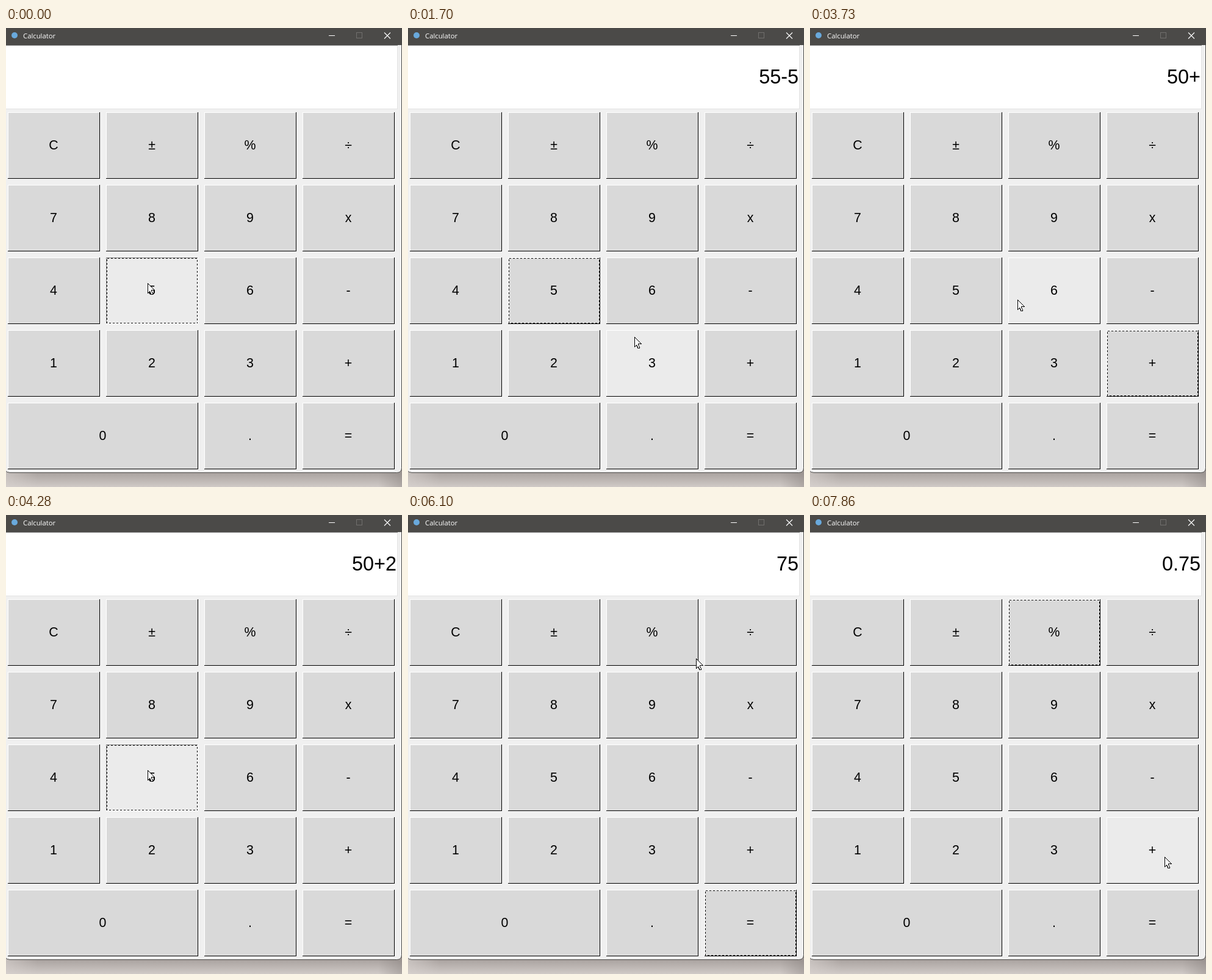
These frames come from a looping animation (649x752 px, 8 s). An HTML page:

```html
<!DOCTYPE html>
<html lang="en">
<head>
<meta charset="utf-8">
<title>Calculator</title>
<style>
  html, body { margin: 0; width: 100%; height: 100%; overflow: hidden; }
  svg { display: block; width: 649px; height: 752px; }
  text { font-family: "Liberation Sans", Arial, sans-serif; }
  .bar { font: 11.3px "Open Sans", "Noto Sans", sans-serif; fill: #fff; }
  .label { font-size: 21.33px; text-anchor: middle; }
  .face { fill: #d9d9d9; }
  .hover .face { fill: #ebebeb; }
  .lite { fill: #fff; }
  .dark { fill: #000; }
  .pressed .lite { fill: #828282; }
  .pressed .dark { fill: #fff; }
  .focus { fill: none; stroke: #000; stroke-dasharray: 3; visibility: hidden; }
  .focused .focus { visibility: visible; }
  .crisp, .key rect, .key path { shape-rendering: crispEdges; }
</style>
</head>
<body>
<svg viewBox="0 0 649 752">
  <defs>
    <linearGradient id="shade" x2="0" y2="1">
      <stop offset=".4" stop-color="#aca5a2"/>
      <stop offset="1" stop-color="#d0cac7"/>
    </linearGradient>
    <linearGradient id="side">
      <stop offset="0" stop-color="#d8d2cf" stop-opacity=".6"/>
      <stop offset=".08" stop-color="#d8d2cf" stop-opacity="0"/>
      <stop offset=".94" stop-color="#807976" stop-opacity="0"/>
      <stop offset="1" stop-color="#807976" stop-opacity=".4"/>
    </linearGradient>
  </defs>
  <rect y="716" width="649" height="36" fill="url(#shade)"/>
  <rect y="716" width="649" height="36" fill="url(#side)"/>
  <path d="M-2 -2H648.5V720.5Q648.5 728.5 640.5 728.5H6Q1 728.5 -2 724Z" fill="#f0f0f0" stroke="#4b4a48"/>
  <g class="crisp">
    <rect width="649" height="28" fill="#4b4a48"/>
    <rect y="28" width="642" height="105" fill="#e3e3e3"/>
    <rect y="28" width="642" height="1" fill="#828282"/>
    <rect y="29" width="641" height="103" fill="#fff"/>
    <path d="M529 12.5H539" stroke="#fff"/>
    <rect x="574.5" y="7.5" width="9" height="9" fill="none" stroke="#716f6d"/>
  </g>
  <path d="M620 7.5L630 17.5M630 7.5L620 17.5" stroke="#fff" stroke-width="1.1"/>
  <circle cx="14" cy="12" r="5" fill="#69a9dc"/>
  <text class="bar" x="28" y="17">Calculator</text>
  <text id="display" x="640" y="91" font-size="32.4" text-anchor="end"></text>
  <g id="keys"></g>
  <path id="cursor" class="crisp" d="M.5 .5V16.5L3.5 13.5L6 18.5H8L8.5 17L6.5 12.5V11.5H11.5Z" fill="#fff" stroke="#000"/>
</svg>
<script>
const LOOP = 8000, BEAT = LOOP / 59;
const HOLD = 120;   // how long a key stays down
const READ = 300;   // how long the pointer rests on a result
const EDGE = 6;
const byId = id => document.getElementById(id);

// Each row lists its labels; the wide 0 takes two columns.
const keys = ["C±%÷", "789x", "456-", "123+", "0 .="].flatMap((row, r) =>
  [...row].map((name, c) => ({
    name, x: 3 + 161 * c, y: 138 + 119 * r, w: name === "0" ? 312 : 151, h: 109
  })).filter(key => key.name !== " "));

byId("keys").innerHTML = keys.map(({ name, x, y, w, h }) => `
  <g class="key" transform="translate(${x} ${y})">
    <rect class="face" width="${w}" height="${h}"/>
    <path class="lite" d="M0 0H${w}V1H1V${h}H0Z"/>
    <path class="dark" d="M${w} 0V${h}H0V${h - 1}H${w - 1}V0Z"/>
    <text class="label" x="${w / 2 - 0.5}" y="61">${name}</text>
    <rect class="focus" x="1.5" y="1.5" width="${w - 3}" height="${h - 3}"/>
  </g>`).join("");
document.querySelectorAll(".key").forEach((el, i) => keys[i].el = el);

// Key presses, and points the pointer passes on its way
const stops = [
  { at: 0, key: "5" },
  { at: 290, key: "5" },
  { at: 990, key: "-" },
  { at: 1430, key: "5", hold: 0 },
  { at: 1700, x: 371, y: 506 },
  { at: 2220, key: "=" },
  { at: 2880, x: 557, y: 434 },
  { at: 3310, key: "+" },
  { at: 3730, x: 340, y: 445 },
  { at: 4010, key: "2" },
  { at: 4280, key: "5" },
  { at: 4810, key: "=", x: 551, y: 652 },
  { at: 6100, x: 472, y: 235 },
  { at: 6490, key: "%" },
  { at: 7860, x: 581, y: 560 }
];

// The pointer moves only on the beat.
const beatOf = t => Math.floor(t / BEAT + 0.55);

function enter(text, key) {
  if (key === "=") return String(text.match(/[+-]?\d+/g).reduce((sum, n) => sum + Number(n), 0));
  if (key === "%") return String(text / 100);
  return text + key;
}

let typed = "";
for (const s of stops) {
  s.arrive = s.leave = beatOf(s.at);
  if (!s.key) continue;
  const { x, y, w, h } = keys.find(k => k.name === s.key);
  s.x ??= x + w / 2 - 8;
  s.y ??= y + h / 2 - 13;
  s.up = s.at + (s.hold ?? HOLD);
  s.leave = beatOf("=%".includes(s.key) ? s.at + READ : s.up);
  s.text = typed = enter(typed, s.key);
}
const presses = stops.filter(s => s.key);

function pointerAt(beat) {
  const i = stops.findLastIndex(s => s.arrive <= beat);
  const a = stops[i], b = stops[i + 1] ?? a;
  const k = beat > a.leave && b !== a ? (beat - a.leave) / (b.arrive - a.leave) : 0;
  const ease = k * k * (3 - 2 * k);
  return [Math.round(a.x + (b.x - a.x) * ease), Math.round(a.y + (b.y - a.y) * ease)];
}

const over = (key, x, y) =>
  x >= key.x + EDGE && x < key.x + key.w - EDGE && y >= key.y && y < key.y + key.h;

function draw(t) {
  const [x, y] = pointerAt(beatOf(t));
  const last = presses.findLast(p => p.at <= t);
  const done = presses.findLast(p => p.up <= t);
  for (const key of keys) {
    const active = key.name === last.key;
    key.el.classList.toggle("hover", over(key, x, y));
    key.el.classList.toggle("focused", active);
    key.el.classList.toggle("pressed", active && t < last.up);
  }
  byId("display").textContent = done ? done.text : "";
  byId("cursor").setAttribute("transform", `translate(${x} ${y})`);
}

const start = performance.now();
function loop() {
  draw((performance.now() - start) % LOOP);
  requestAnimationFrame(loop);
}
loop();
</script>
</body>
</html>
```
